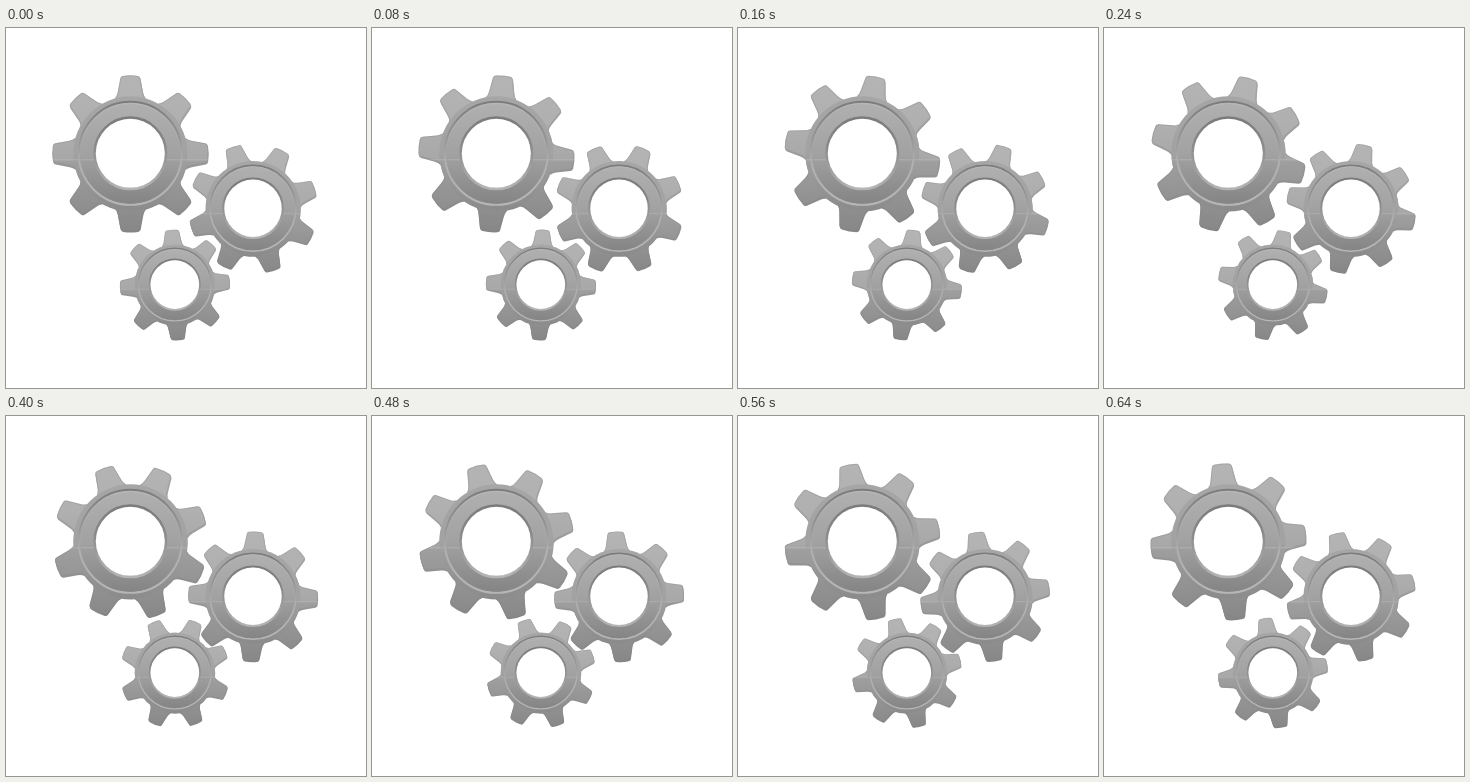
Write an HTML page with a canvas that moves like this. It is 360 px wide and 360 px high and loops after 720 ms.

```html
<!DOCTYPE html>
<html lang="en">
<head>
<meta charset="utf-8">
<title>Gears</title>
<style>
html, body { margin: 0; width: 100%; height: 100%; overflow: hidden; background: #fff; }
canvas { display: block; width: 100vw; height: 100vh; }
</style>
</head>
<body>
<canvas id="stage" width="360" height="360"></canvas>
<script>
const ctx = document.getElementById('stage').getContext('2d');
const STEP_MS = 80, STEPS = 9, STEP_DEG = 5, TEETH = 8;
const TIP = 78, BODY = 57, GROOVE = 51.5, HOLE = 34.5, DEPTH = 1.3;

// x, y, scale, start angle, direction
const gears = [
  { x: 124.3, y: 125.3, s: 1, a: 0, dir: 1 },
  { x: 247, y: 180.3, s: 0.832, a: 27, dir: -1 },
  { x: 168.8, y: 256.6, s: 0.705, a: -3, dir: 1 }
];

function vertical(r, stops) {
  const g = ctx.createLinearGradient(0, -r, 0, r);
  stops.forEach(([at, color]) => g.addColorStop(at, color));
  return g;
}

function disc(r) {
  const p = new Path2D();
  p.arc(0, 0, r, 0, 2 * Math.PI);
  return p;
}

function tooth() {
  const p = new Path2D();
  p.moveTo(-16, -52);
  p.lineTo(-15, -55.5);
  p.quadraticCurveTo(-13.2, -57.5, -12.6, -61);
  p.lineTo(-10, -75);
  p.quadraticCurveTo(-9.6, -77, -7.5, -77.4);
  p.quadraticCurveTo(0, -78.6, 7.5, -77.4);
  p.quadraticCurveTo(9.6, -77, 10, -75);
  p.lineTo(12.6, -61);
  p.quadraticCurveTo(13.2, -57.5, 15, -55.5);
  p.lineTo(16, -52);
  p.closePath();
  return p;
}

const toothPath = tooth();

function teeth(angle) {
  const all = new Path2D();
  for (let i = 0; i < TEETH; i++) {
    all.addPath(toothPath, new DOMMatrix().rotate(angle + i * 360 / TEETH));
  }
  return all;
}

function ring(r, width, stops) {
  ctx.lineWidth = width;
  ctx.strokeStyle = vertical(r, stops);
  ctx.stroke(disc(r));
}

function drawGear({ x, y, s, a, dir }, step) {
  const cogs = teeth(a + dir * step * STEP_DEG);
  const outline = new Path2D(cogs);
  outline.addPath(disc(BODY));
  ctx.save();
  ctx.translate(x, y);
  ctx.scale(s, s);

  // Lower edge gives the gear its thickness
  ctx.save();
  ctx.translate(DEPTH * 0.3, DEPTH);
  ctx.fillStyle = vertical(TIP, [[0, '#a6a6a6'], [0.5, '#999'], [1, '#858585']]);
  ctx.fill(cogs);
  ctx.fill(disc(BODY));
  ctx.restore();

  ctx.fillStyle = vertical(TIP, [[0, '#b4b4b4'], [0.3, '#b0b0b0'], [0.53, '#a8a8a8'], [0.56, '#9e9e9e'], [1, '#878787']]);
  ctx.fill(cogs);

  ctx.save();
  ctx.clip(cogs);
  ctx.lineWidth = 2;
  ctx.strokeStyle = 'rgba(130,130,130,0.3)';
  ctx.stroke(cogs);
  ctx.restore();

  ctx.fillStyle = vertical(BODY, [[0, '#a6a6a6'], [0.5, '#a2a2a2'], [1, '#8b8b8b']]);
  ctx.fill(disc(BODY));
  ctx.fillStyle = vertical(GROOVE, [[0, '#b0b0b0'], [0.5, '#a2a2a2'], [1, '#848484']]);
  ctx.fill(disc(GROOVE));

  // Gloss seam across teeth and rim
  ctx.save();
  ctx.clip(outline);
  ctx.fillStyle = 'rgba(188,188,188,0.5)';
  ctx.fillRect(-TIP, 5.8, 2 * TIP, 1.3);
  ctx.restore();

  ring(GROOVE, 2, [[0, '#7c7c7c'], [0.35, '#959595'], [0.6, '#b0b0b0'], [1, '#b6b6b6']]);
  ring(GROOVE - 1.6, 1, [[0, '#b8b8b8'], [0.5, '#a4a4a4'], [1, '#868686']]);
  ring(HOLE + 1.2, 2.6, [[0, '#7b7b7b'], [0.4, '#8a8a8a'], [0.65, '#9c9c9c'], [1, '#b4b4b4']]);
  ctx.fillStyle = '#fff';
  ctx.fill(disc(HOLE));
  ctx.restore();
}

function draw(step) {
  ctx.fillStyle = '#fff';
  ctx.fillRect(0, 0, 360, 360);
  gears.forEach(g => drawGear(g, step));
}

const start = performance.now();
function tick() {
  const t = Math.max(0, performance.now() - start);
  draw(Math.floor(t / STEP_MS) % STEPS);
  requestAnimationFrame(tick);
}
tick();
</script>
</body>
</html>
```
